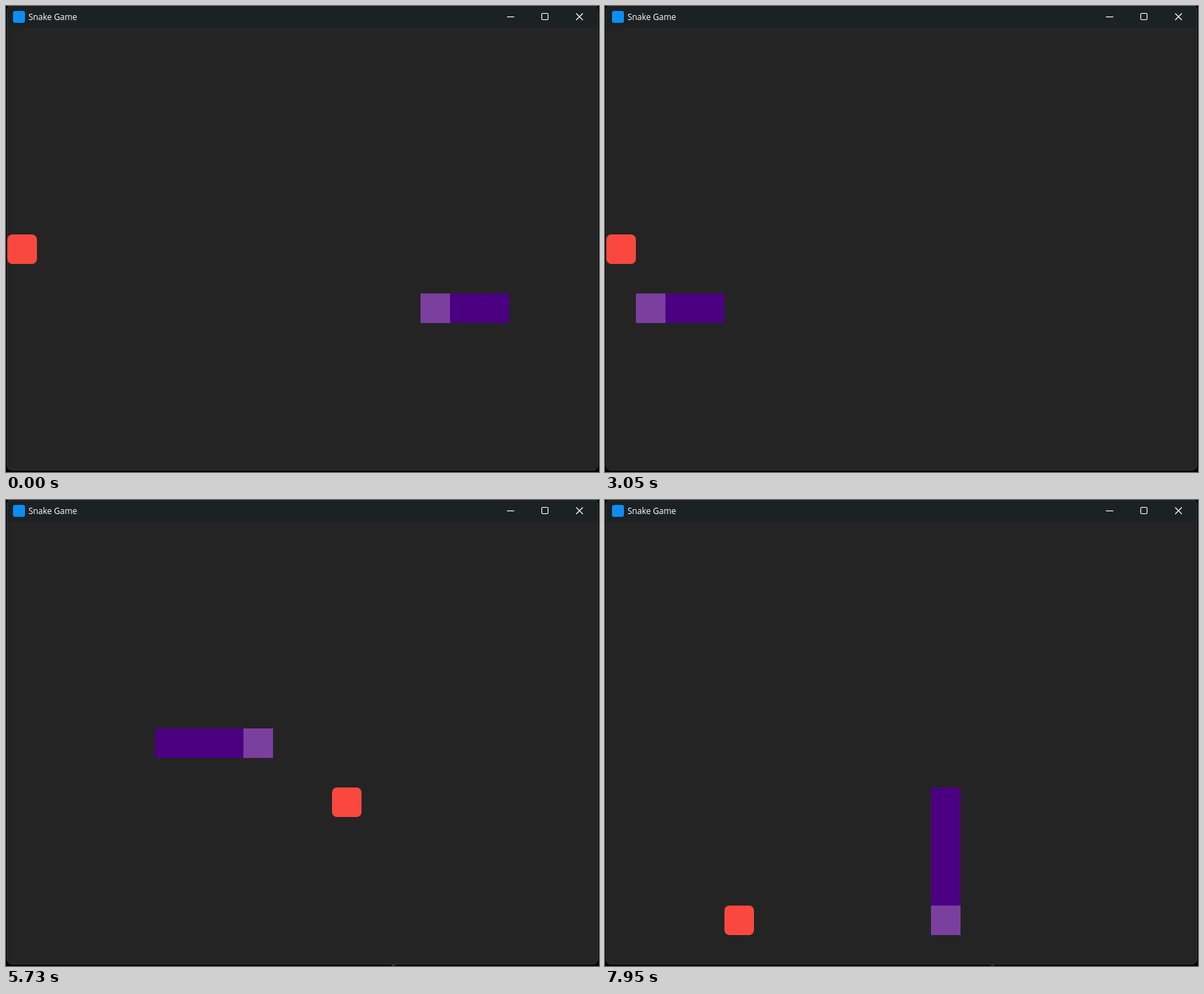
Write an HTML page that moves like this. It is 844 px wide and 663 px high and loops after 8000 ms.

```html
<!DOCTYPE html>
<html lang="en">
<head>
<meta charset="utf-8">
<title>Snake Game</title>
<style>
  html, body { margin: 0; width: 100%; height: 100%; overflow: hidden; background: #000; }
  svg { display: block; width: 844px; height: 663px; }
  text { font: 11.9px "Open Sans", "Noto Sans", sans-serif; fill: #fff; }
  .icons { fill: none; stroke: #fff; stroke-width: 1.1; }
</style>
</head>
<body>
<svg viewBox="0 0 844 663">
  <defs>
    <clipPath id="win"><rect x="1" y="-1" width="842" height="662" rx="8"/></clipPath>
  </defs>
  <g clip-path="url(#win)">
    <rect width="844" height="663" fill="#242424"/>
    <rect width="844" height="31" fill="#1c2124"/>
  </g>
  <rect x="1.5" y="-.5" width="841" height="661" rx="7.5" fill="none" stroke="#303233"/>
  <rect x="10" y="7" width="17" height="17" rx="3" fill="#0d8df0"/>
  <text x="32" y="20">Snake Game</text>
  <g class="icons">
    <path d="M713 15.5h10.5"/>
    <rect x="762.5" y="10.5" width="9" height="9" rx="1.5"/>
    <path d="M811.5 10.5l9.5 9.5M821 10.5l-9.5 9.5"/>
  </g>
  <rect id="mark" x="549" y="661" width="5" height="2" rx="1" fill="#8a8a8a"/>
  <g id="snake"></g>
  <rect id="apple" width="42" height="42" rx="7" fill="#fa483f"/>
</svg>
<script>
const LOOP = 8000, CELL = 42, LEFT = 2, TOP = 31;

// Moment of each move, and the direction taken
const times = [
  100, 345, 590, 835, 1080, 1340, 1610, 1850, 2080, 2330, 2580, 2790, 3050, 3300,
  3570, 3820,
  4060, 4270, 4510, 4760, 5000, 5240, 5490, 5730, 5950, 6210, 6470,
  6720, 6970, 7190, 7450, 7700, 7950
];
const route = "L".repeat(14) + "U".repeat(2) + "R".repeat(11) + "D".repeat(6);
const dirs = { L: [-1, 0], R: [1, 0], U: [0, -1], D: [0, 1] };

// Apple cell and snake length from each time on
const stages = [
  { at: 0, apple: [0, 7], size: 3 },
  { at: 3820, apple: [11, 9], size: 4 },
  { at: 6970, apple: [4, 13], size: 5 }
];

const path = [[16, 9], [15, 9], [14, 9]];
for (const d of route) {
  const [x, y] = path[path.length - 1];
  path.push([x + dirs[d][0], y + dirs[d][1]]);
}

const snake = document.getElementById("snake");
const apple = document.getElementById("apple");
const mark = document.getElementById("mark");

function place(el, [col, row]) {
  el.setAttribute("x", LEFT + col * CELL);
  el.setAttribute("y", TOP + row * CELL);
}

const cells = Array.from({ length: 5 }, (_, i) => {
  const el = document.createElementNS("http://www.w3.org/2000/svg", "rect");
  el.setAttribute("width", CELL);
  el.setAttribute("height", CELL);
  el.setAttribute("fill", i ? "#4b0082" : "#7b3fa0");
  snake.prepend(el);
  return el;
});

function draw(t) {
  const head = 2 + times.filter(m => m <= t).length;
  const stage = stages.filter(s => s.at <= t).pop();
  cells.forEach((el, i) => {
    const shown = i < stage.size;
    el.style.display = shown ? "" : "none";
    if (shown) place(el, path[head - i]);
  });
  place(apple, stage.apple);
  mark.style.opacity = t < 4760 ? 0 : t < 5950 ? 0.35 : t < 7190 ? 0.85 : 0.3;
}

const start = performance.now();
function tick() {
  draw((performance.now() - start) % LOOP);
  requestAnimationFrame(tick);
}
tick();
</script>
</body>
</html>
```
